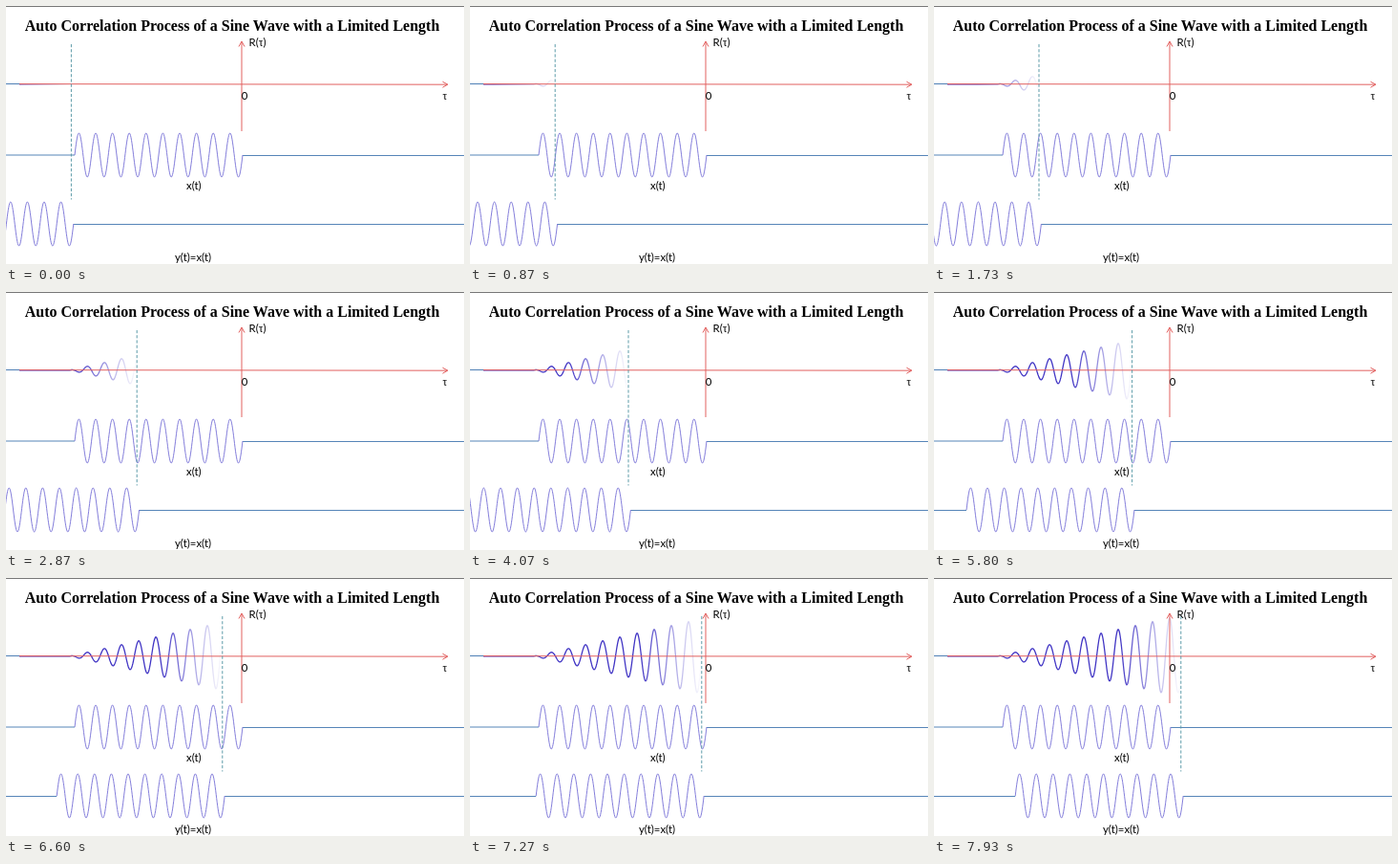
These frames come from a looping animation (480 by 270 pixels, 8 s). An HTML page:

```html
<!DOCTYPE html>
<html lang="en">
<head>
<meta charset="utf-8">
<title>Auto correlation</title>
<style>
  html, body { margin: 0; width: 100%; height: 100%; overflow: hidden; background: #fff; }
  svg { display: block; width: 480px; height: 270px; }
  path { fill: none; }
  text { font: 11.4px Lato, sans-serif; fill: #000; }
  .title { font: bold 16px "Liberation Serif", serif; }
  .tau { font: 12px "Liberation Serif", serif; }
  .base { stroke: #5685b8; stroke-width: 1.1; }
  .wave { stroke: #7d76d8; stroke-width: 0.95; }
  .axis { stroke: #e2605f; stroke-width: 1; }
  .marker { stroke: #5c9ba8; stroke-width: 1; stroke-dasharray: 3.2 2; }
</style>
</head>
<body>
<svg viewBox="0 0 480 270">
  <defs>
    <linearGradient id="fade" gradientUnits="userSpaceOnUse" x1="-65" x2="0" y1="0" y2="0">
      <stop offset="0" stop-color="#4034c4"/>
      <stop offset="1" stop-color="#4034c4" stop-opacity="0"/>
    </linearGradient>
  </defs>
  <rect width="480" height="1" fill="#777"/>
  <text class="title" x="19.7" y="26">Auto Correlation Process of a Sine Wave with a Limited Length</text>

  <path class="base" d="M0 81.5H15"/>
  <path id="result" stroke="url(#fade)" stroke-width="1.3"/>
  <path class="axis" d="M14 81.6L463 82.2M247 131V37"/>
  <path class="axis" d="M457.5 79.2L463 82.2L457.5 85.2M244 42.5L247 37L250 42.5"/>

  <path class="base" d="M0 156H72M248 156.5H480"/>
  <path class="wave" id="fixed"/>
  <g id="sliding">
    <path class="base" d="M-300 228.5H-176M0 228.5H480"/>
    <path class="wave" id="moving"/>
  </g>
  <path class="marker" id="marker" d="M0 40V202.5"/>

  <text x="254.5" y="42">R(<tspan class="tau">τ</tspan>)</text>
  <text x="246.7" y="97.5">0</text>
  <text class="tau" x="457.5" y="97.5">τ</text>
  <text x="189" y="192.3">x(t)</text>
  <text x="177" y="267">y(t)=x(t)</text>
</svg>
<script>
  const byId = id => document.getElementById(id);
  const LENGTH = 176, CYCLES = 10, PEAK_X = 247, REACH = 180;

  function plot(id, from, to, f) {
    const points = [];
    for (let x = from; x <= to; x += 0.5) points.push(x + ' ' + f(x).toFixed(2));
    byId(id).setAttribute('d', 'M' + points.join('L'));
  }

  const burst = (start, mid) => x =>
    mid - 23 * Math.sin(2 * Math.PI * CYCLES * (x - start) / LENGTH);

  function correlation(x) {
    const envelope = Math.max(0, 1 - Math.abs(x - PEAK_X) / REACH);
    return 81.8 - 40 * envelope * Math.cos(2 * Math.PI * (x - PEAK_X) / 18);
  }

  plot('fixed', 72, 72 + LENGTH, burst(72, 156));
  plot('moving', -LENGTH, 0, burst(-LENGTH, 228));
  plot('result', 14, 270, correlation);

  function draw(now) {
    // The motion advances in 15 steps per second.
    const step = Math.min(119, Math.floor((now % 8000 + 5) * 15 / 1000));
    const x = 68.4 + 1.6 * step;
    byId('marker').setAttribute('transform', `translate(${x})`);
    byId('sliding').setAttribute('transform', `translate(${x + 2.4})`);
    byId('fade').setAttribute('gradientTransform', `translate(${x})`);
    requestAnimationFrame(draw);
  }
  draw(performance.now());
</script>
</body>
</html>
```
